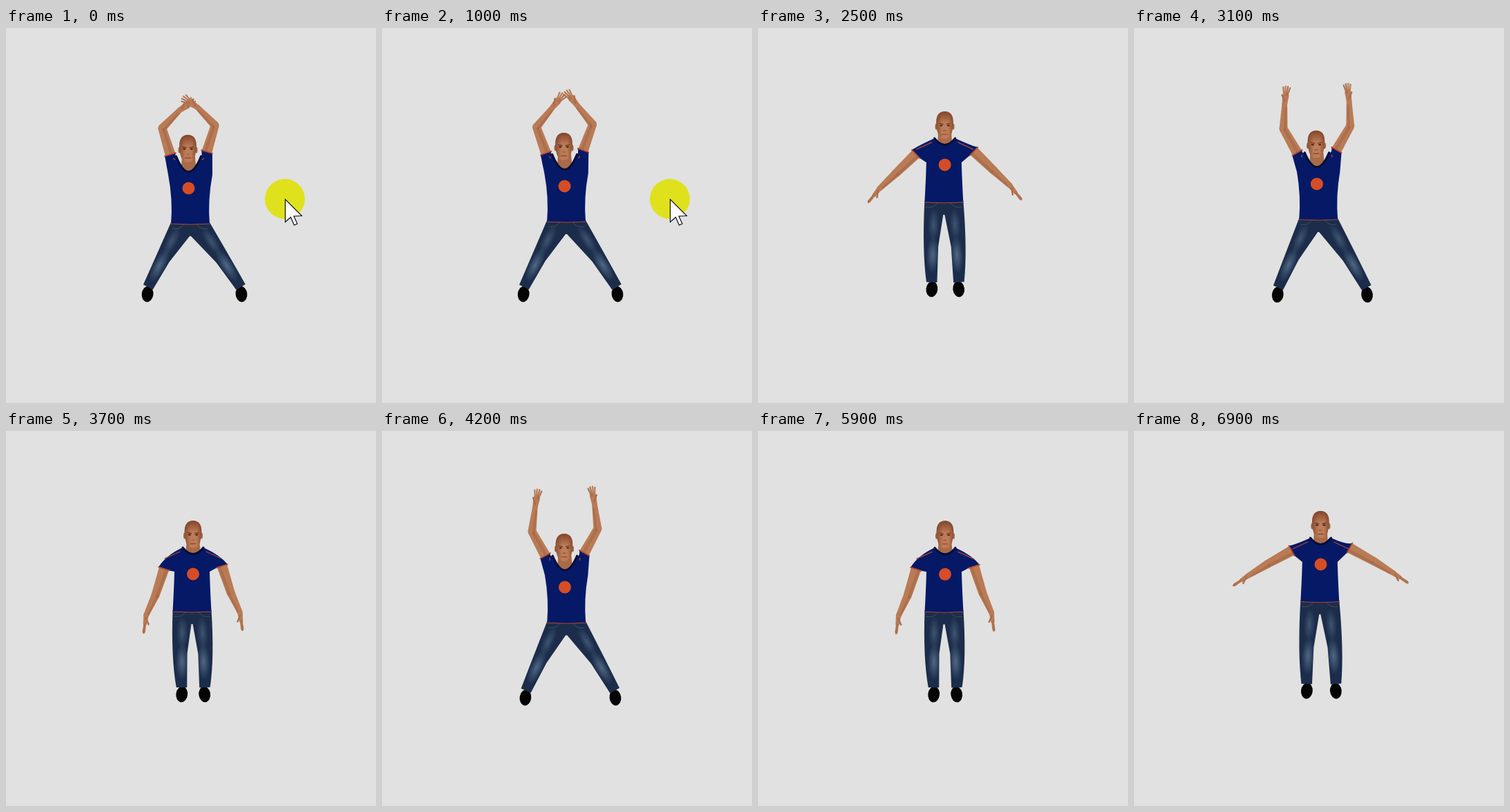
These frames come from a looping animation (536x544 px, 7000 ms). An HTML page with a canvas:

```html
<!DOCTYPE html>
<html lang="en">
<head>
<meta charset="utf-8">
<title>Jumping jacks</title>
<style>
html, body { margin: 0; width: 100%; height: 100%; overflow: hidden; background: #e1e1e1; }
canvas { display: block; width: 536px; height: 544px; }
</style>
</head>
<body>
<canvas id="stage" width="536" height="544"></canvas>
<script>
const ctx = document.getElementById('stage').getContext('2d');
const STEP = 100, STEPS = 70, CYCLE = 11;
const SKIN = '#b97b56', SKIN_DARK = '#8f5435', SHIRT = '#051967', TRIM = '#b4472c', JEANS = '#1b2d4a';

// Head top, foot spread, foot bottom, then upper arm, forearm and hand angles from hanging
const POSES = [
  [155, 68, 397, 163, 224, 236],
  [143, 58, 396, 142, 165, 168],
  [120, 38, 390, 95, 102, 103],
  [116, 21, 388, 61, 59, 56],
  [130, 16.5, 393, 18, 25, 8],
  [137, 16.5, 395, 12, 11, -3],
  [134, 16.5, 394, 22, 26, 12],
  [118, 22, 388, 70, 68, 64],
  [122, 42, 391, 110, 112, 112],
  [148, 64, 398, 148, 175, 180],
  [152, 68, 397, 160, 219, 219]
];
// [step, value] tracks
const NUDGE = [[0, 0], [10, 0], [25, .35], [37, 0], [48, .6], [59, .05], [69, 0]];
const POINTER = [[0, 404], [8, 413], [10, 417], [11, 432], [12, 465], [13, 505]];

const lerp = (a, b, t) => a + (b - a) * t;
const clamp01 = v => Math.max(0, Math.min(1, v));
const rad = d => d * Math.PI / 180;

function track(keys, n) {
  const i = keys.findIndex(k => k[0] >= n);
  if (i < 1) return keys[i < 0 ? keys.length - 1 : 0][1];
  const [a, b] = [keys[i - 1], keys[i]];
  return lerp(a[1], b[1], (n - a[0]) / (b[0] - a[0]));
}

function poseAt(n) {
  const phase = n % CYCLE + track(NUDGE, n), i = Math.floor(phase);
  const next = POSES[(i + 1) % CYCLE];
  return POSES[i % CYCLE].map((v, k) => lerp(v, next[k], phase - i));
}

function ellipse(x, y, rx, ry, fill, turn = 0) {
  ctx.fillStyle = fill;
  ctx.beginPath();
  ctx.ellipse(x, y, rx, ry, turn, 0, Math.PI * 2);
  ctx.fill();
}

function line(a, b, width, color) {
  ctx.strokeStyle = color;
  ctx.lineWidth = width;
  ctx.beginPath();
  ctx.moveTo(...a);
  ctx.lineTo(...b);
  ctx.stroke();
}

function taper(a, b, wa, wb, color) {
  const len = Math.hypot(b[0] - a[0], b[1] - a[1]) || 1;
  const nx = -(b[1] - a[1]) / len, ny = (b[0] - a[0]) / len;
  ctx.fillStyle = color;
  ctx.beginPath();
  ctx.moveTo(a[0] + nx * wa, a[1] + ny * wa);
  ctx.lineTo(b[0] + nx * wb, b[1] + ny * wb);
  ctx.lineTo(b[0] - nx * wb, b[1] - ny * wb);
  ctx.lineTo(a[0] - nx * wa, a[1] - ny * wa);
  ctx.fill();
  ellipse(b[0], b[1], wb, wb, color);
}

function polar([x, y], side, deg, len) {
  return [x + side * Math.sin(rad(deg)) * len, y + Math.cos(rad(deg)) * len];
}

function build(n) {
  const [head, spread, footY, upper, fore, hand] = poseAt(n);
  const open = clamp01((spread - 16.5) / 51.5);
  const raise = clamp01((upper - 61) / 102);
  const top = 271 - 6.5 * open;
  const arms = [-1, 1].map(side => {
    const shoulder = [top + side * lerp(42, 26.5, raise), head + 75 - upper * .285 - (side > 0 ? 4 : 0)];
    const elbow = polar(shoulder, side, upper, 40);
    const wrist = polar(elbow, side, fore, 32 + 4 * raise);
    const c = Math.cos(rad(upper)) * 8.3, s = Math.sin(rad(upper)) * 8.3;
    return {
      side, shoulder, elbow, wrist,
      cuffTop: [shoulder[0] + side * c, shoulder[1] - s],
      cuffLow: [shoulder[0] - side * c, shoulder[1] + s]
    };
  });
  return {
    head, spread, footY, hand, open, raise, top, arms,
    hips: 269.5 - 2.5 * open,
    hem: head + 132 - 3 * open
  };
}

function drawLeg(b, side) {
  const foot = [271.2 + 1.8 * b.open + side * b.spread, b.footY - 11];
  const ankle = [foot[0] - side * b.open, b.footY - 21];
  const hip = [b.hips + side * 14, b.hem];
  const len = Math.hypot(ankle[0] - hip[0], ankle[1] - hip[1]);
  const out = [side * (ankle[1] - hip[1]) / len, -side * (ankle[0] - hip[0]) / len];
  const knee = [lerp(hip[0], ankle[0], .55) + side * 3 * (1 - b.open), lerp(hip[1], ankle[1], .55)];
  const off = (p, w) => [p[0] + out[0] * w, p[1] + out[1] * w];
  const through = (a, m, z) => ctx.quadraticCurveTo(2 * m[0] - (a[0] + z[0]) / 2, 2 * m[1] - (a[1] + z[1]) / 2, ...z);
  const waist = [b.hips + side * 28, b.hem - 2], crotch = [b.hips + side, b.hem + 18];

  ellipse(foot[0], foot[1], 8.4, 11.5, '#050506', -side * .12);
  ctx.save();
  ctx.fillStyle = JEANS;
  ctx.beginPath();
  ctx.moveTo(b.hips, b.hem - 2);
  ctx.lineTo(...waist);
  through(waist, off(knee, 10.5), off(ankle, 8));
  ctx.lineTo(...off(ankle, -7.5));
  ctx.lineTo(...off(knee, -10.5));
  ctx.lineTo(...crotch);
  ctx.lineTo(b.hips - side, b.hem + 18);
  ctx.closePath();
  ctx.fill();
  ctx.clip();
  // Worn patches along the leg
  for (const [t, length, alpha] of [[.28, 24, .4], [.66, 27, .6]]) {
    ctx.save();
    ctx.translate(lerp(hip[0], ankle[0], t), lerp(hip[1], ankle[1], t));
    ctx.rotate(Math.atan2(ankle[1] - hip[1], ankle[0] - hip[0]) - Math.PI / 2);
    ctx.scale(.34, 1);
    const fade = ctx.createRadialGradient(0, 0, 1, 0, 0, length);
    fade.addColorStop(0, `rgba(112,140,168,${alpha})`);
    fade.addColorStop(1, 'rgba(112,140,168,0)');
    ctx.fillStyle = fade;
    ctx.fillRect(-length, -length, 2 * length, 2 * length);
    ctx.restore();
  }
  ctx.restore();
  ctx.strokeStyle = '#46566b';
  ctx.lineWidth = .8;
  ctx.beginPath();
  ctx.moveTo(b.hips + side * 10, b.hem + 1);
  ctx.quadraticCurveTo(b.hips + side * 14, b.hem + 9, b.hips + side * 26, b.hem + 7);
  ctx.stroke();
}

function drawArm(b, { side, shoulder, elbow, wrist }) {
  taper(shoulder, elbow, 7.5, 6, SKIN);
  taper(elbow, wrist, 6, 3.8, SKIN);
  const mid = t => [lerp(elbow[0], wrist[0], t) - side * 2, lerp(elbow[1], wrist[1], t) + 2];
  ctx.globalAlpha = .3;
  line([shoulder[0] - side * 3, shoulder[1] + 3], [elbow[0] - side * 2, elbow[1] + 2], 4, SKIN_DARK);
  line(mid(0), mid(.9), 3, SKIN_DARK);
  ctx.globalAlpha = 1;
  const palm = polar(wrist, side, b.hand, 13);
  taper(wrist, palm, 3.8, 2.6 + 2.4 * b.raise, SKIN);
  const fan = 1 + 9 * b.raise;
  for (let i = -1.5; i <= 1.5; i++) {
    const base = polar(palm, side, b.hand + 90, i * (.5 + 1.2 * b.raise));
    line(base, polar(base, side, b.hand + i * fan, 14 - 1.5 * Math.abs(i)), 2.2, i > 0 ? '#ad704d' : SKIN);
  }
  line(polar(wrist, side, b.hand, 4), polar(wrist, side, b.hand - 22, 14), 2.4, '#a96c49');
}

function drawShirt(b) {
  const { top, hips, head, hem, raise, arms: [l, r] } = b;
  const neckX = lerp(15, 18, raise), neckY = head + lerp(39, 31, raise);
  const neckDip = head + lerp(58, 76, raise);
  const topControl = side => [top + side * lerp(39, 20, raise), head + lerp(50, 31, raise)];
  const pit = side => [hips + side * lerp(25.5, 32, raise), head + lerp(74, 58, raise)];
  const waistX = lerp(26, 25, raise);

  taper([top, head + 32], [top, head + 50], 9.5, 11, '#a86a48');
  ctx.fillStyle = SHIRT;
  ctx.beginPath();
  ctx.moveTo(top - neckX, neckY);
  ctx.quadraticCurveTo(...topControl(-1), ...l.cuffTop);
  ctx.lineTo(...l.cuffLow);
  ctx.lineTo(...pit(-1));
  ctx.quadraticCurveTo(hips - waistX, head + 95, hips - 28, hem);
  ctx.quadraticCurveTo(hips, hem + 2, hips + 28, hem);
  ctx.quadraticCurveTo(hips + waistX, head + 95, ...pit(1));
  ctx.lineTo(...r.cuffLow);
  ctx.lineTo(...r.cuffTop);
  ctx.quadraticCurveTo(...topControl(1), top + neckX, neckY);
  ctx.quadraticCurveTo(top, neckDip, top - neckX, neckY);
  ctx.fill();

  ctx.strokeStyle = '#050d38';
  ctx.lineWidth = 3;
  ctx.beginPath();
  ctx.moveTo(top - neckX, neckY);
  ctx.quadraticCurveTo(top, neckDip, top + neckX, neckY);
  ctx.stroke();

  ctx.strokeStyle = TRIM;
  ctx.lineWidth = 1;
  ctx.beginPath();
  ctx.moveTo(hips - 28, hem);
  ctx.quadraticCurveTo(hips, hem + 2, hips + 28, hem);
  ctx.stroke();
  for (const arm of b.arms) {
    line(arm.cuffTop, arm.cuffLow, 1.8, TRIM);
    const [x, y] = topControl(arm.side);
    line([top + arm.side * (neckX + 4), neckY + 6 - 3 * raise], [lerp(x, arm.cuffTop[0], .2), y + 5], 1.3, TRIM);
  }
  ellipse(top, head + 77.5, 9, 9, '#d64d25');
}

function drawHead({ top, head, open }) {
  const x = top - open;
  for (const side of [-1, 1]) ellipse(x + side * 12.2, head + 22, 1.8, 4.5, '#a4613f');
  const face = ctx.createLinearGradient(x - 12, 0, x + 12, 0);
  face.addColorStop(0, '#8a4f32');
  face.addColorStop(.35, '#bd7c57');
  face.addColorStop(.7, '#bd7c57');
  face.addColorStop(1, '#8a4f32');
  ctx.fillStyle = face;
  ctx.beginPath();
  ctx.moveTo(x, head);
  ctx.bezierCurveTo(x + 15.5, head, x + 13, head + 20, x + 10.5, head + 30);
  ctx.bezierCurveTo(x + 8, head + 43, x - 8, head + 43, x - 10.5, head + 30);
  ctx.bezierCurveTo(x - 13, head + 20, x - 15.5, head, x, head);
  ctx.fill();
  const crown = ctx.createLinearGradient(0, head, 0, head + 17);
  crown.addColorStop(0, 'rgba(126,65,40,.95)');
  crown.addColorStop(1, 'rgba(126,65,40,0)');
  ctx.fillStyle = crown;
  ctx.fill();
  for (const side of [-1, 1]) {
    line([x + side * 2.5, head + 18.5], [x + side * 8, head + 17.5], 1.3, '#704028');
    ellipse(x + side * 5.2, head + 20.5, 2.2, 1.2, '#4b2c20');
  }
  line([x - 2, head + 28], [x + 2, head + 28], 1.2, SKIN_DARK);
  line([x - 3.8, head + 33.5], [x + 3.8, head + 33.5], 1.4, '#90483a');
}

function drawPointer(n) {
  if (n > 13) return;
  const x = track(POINTER, n), y = 248;
  ellipse(x, y, 29, 29, '#dfe11d');
  const arrow = [[0, 0], [0, 33], [8, 26], [13, 37.5], [17.5, 35.5], [12.5, 24.5], [24, 24]];
  ctx.beginPath();
  arrow.forEach(([dx, dy]) => ctx.lineTo(x + dx + .5, y + dy + .5));
  ctx.closePath();
  ctx.fillStyle = '#fff';
  ctx.fill();
  ctx.strokeStyle = '#000';
  ctx.lineWidth = 1.1;
  ctx.stroke();
}

function draw(n) {
  ctx.fillStyle = '#e1e1e1';
  ctx.fillRect(0, 0, 536, 544);
  ctx.lineCap = 'round';
  const body = build(n);
  [-1, 1].forEach(side => drawLeg(body, side));
  body.arms.forEach(arm => drawArm(body, arm));
  drawShirt(body);
  drawHead(body);
  drawPointer(n);
}

const start = performance.now();
function tick() {
  draw(Math.floor((performance.now() - start) / STEP) % STEPS);
  requestAnimationFrame(tick);
}
tick();
</script>
</body>
</html>
```
